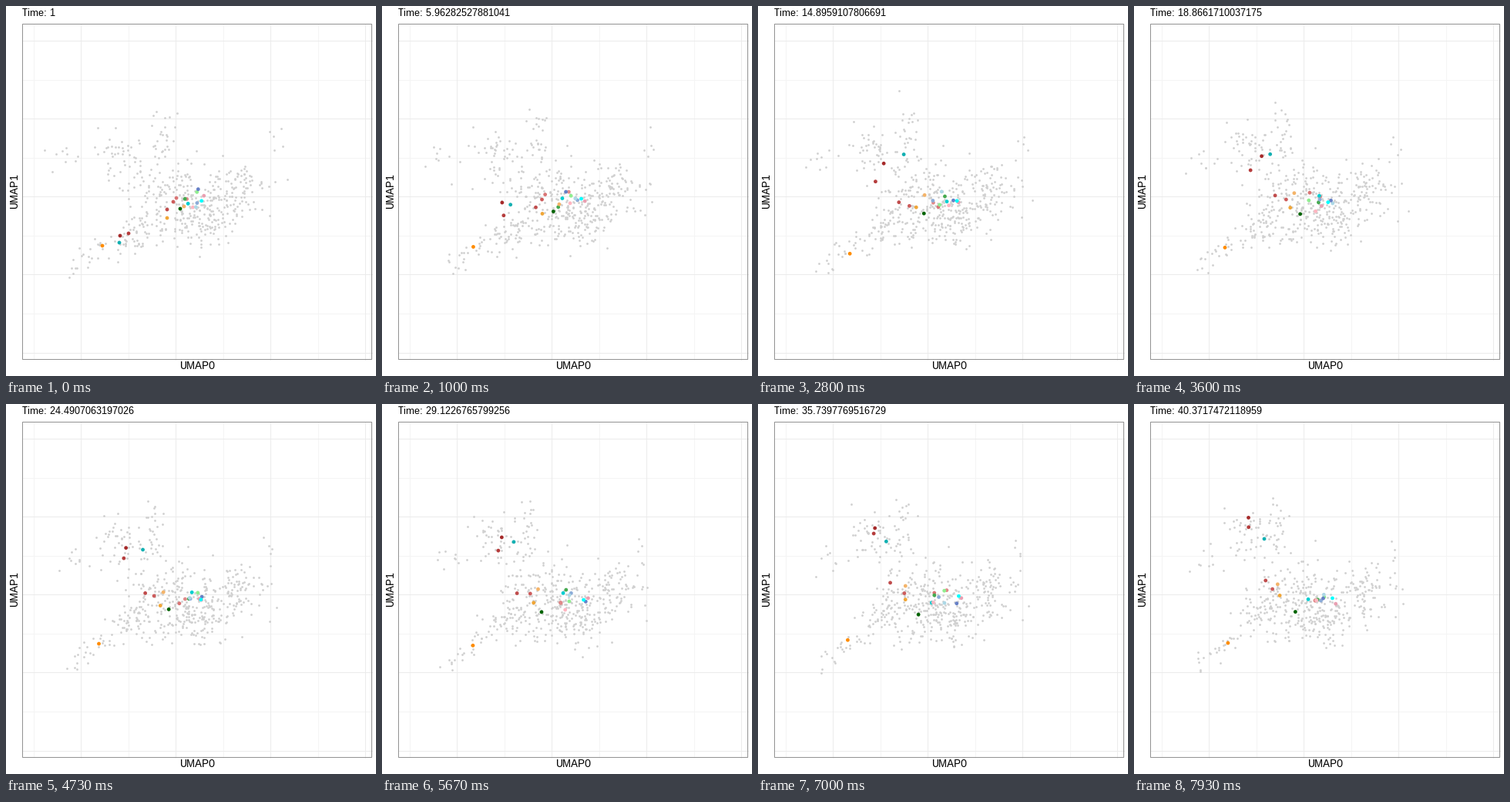
A matplotlib script that plays this animation: 480x480 px, repeating every 8 s.

```python
import numpy as np
import matplotlib.pyplot as plt
from matplotlib.animation import FuncAnimation
from matplotlib.patches import Rectangle

SIZE, DPI = 480, 96
PX = 72 / DPI                      # points per pixel
LOOP, TICKS, POSES = 8000, 400, 120
T = 1 + np.arange(POSES) * 89 / 269
STEPS = np.arange(43)

rng = np.random.default_rng(12)
# whole-pixel glyph spacing
plt.rcParams.update({"font.family": "Liberation Sans",
                     "text.hinting": "default", "text.hinting_factor": 1})


def tween(walk):
    """Linear motion between the places a point has at whole times."""
    k = T.astype(int)
    f = (T - k)[:, None]
    return walk[:, k] * (1 - f) + walk[:, k + 1] * f


def drift(when, places):
    return np.stack([np.interp(STEPS, when, axis) for axis in zip(*places)], axis=-1)


def blob(n, spread, start, end, tilt=0):
    """A drifting cluster whose points take a fresh, heavy-tailed jolt each step."""
    off = np.clip(rng.normal(size=(n, 1, 2)), -2.2, 2.2) * spread
    off[..., 1] += tilt * off[..., 0]
    jolt = np.clip(rng.standard_t(4, size=(n, len(STEPS), 2)), -7, 7) * 4.5
    walk = drift((1, 41), (start, end)) + off + jolt
    return tween(np.clip(walk, (50, 84), (372, 352)))


def marked(places, jolt):
    """One coloured point: its first place is exact, later ones are jolted."""
    noise = np.clip(rng.normal(size=(1, len(STEPS), 2)), -2, 2) * jolt
    noise[:, 1] = 0
    return tween(drift((1, 12, 41), places) + noise)


cloud = np.concatenate([
    blob(145, (30, 21), (252, 262), (234, 264)),            # core
    blob(80, (25, 26), (205, 240), (200, 245)),             # its left side
    blob(45, (32, 11), (225, 290), (228, 288)),             # its lower rim
    blob(85, (22, 20), (304, 240), (302, 245)),             # right arm
    blob(50, (15, 12), (162, 296), (160, 268), -0.5),       # tail root
    blob(22, (16, 6), (104, 327), (106, 322), -0.7),        # tail tip
    blob(44, (15, 15), (152, 195), (150, 166)),             # upper left
    blob(24, (6, 20), (203, 165), (185, 155)),              # plume
    blob(10, (20, 12), (80, 190), (98, 200)),               # far left
    blob(5, (8, 10), (348, 175), (338, 200)),               # far right
])

# central points, ordered from left to right
core_colors = ["#d97575", "#e08a8a", "#46aa50", "#00ced1", "#8cacd8", "#ffb6c1",
               "#90ee90", "#add8e6", "#6680c6", "#e9a0b2", "#00ffff"]
dots = []
for color, x in zip(core_colors, np.linspace(225, 256, len(core_colors))):
    home = (x, 253)
    first = home + rng.normal(size=2) * (4, 7)
    dots.append((color, marked((first, home, home), (9, 7))))

# points that travel away from the centre: start, early place, end
for color, *places in [
    ("#f4b46a", (231, 260), (216, 252), (190, 234)),
    ("#f0a637", (209, 275), (210, 262), (189, 250)),
    ("#cd5c5c", (217, 254), (203, 257), (184, 240)),
    ("#c04c4c", (209, 264), (185, 258), (170, 228)),
    ("#006400", (226, 263), (210, 267), (212, 272)),
    ("#12b0b2", (147, 307), (187, 193), (164, 174)),
    ("#b53c3c", (159, 295), (153, 238), (150, 154)),
    ("#a52a2a", (148, 298), (165, 208), (146, 149)),
    ("#ff8c00", (125, 311), (116, 320), (121, 306)),
]:
    dots.append((color, marked(places, 3)))
colors = [color for color, _ in dots]
tracks = np.concatenate([track for _, track in dots])

fig = plt.figure(figsize=(SIZE / DPI, SIZE / DPI), dpi=DPI, facecolor="white")
ax = fig.add_axes([0, 0, 1, 1])
ax.set(xlim=(0, SIZE), ylim=(SIZE, 0))
ax.axis("off")


def grid(x0, y0, color):
    style = dict(color=color, lw=PX, snap=True, zorder=1)
    for i in range(5):
        x, y = int(x0 + 123 * i), int(y0 + 101.3 * i)
        if x < 475:
            ax.plot([x, x], [23, 459], **style)
        if y < 459:
            ax.plot([21, 475], [y, y], **style)


grid(36, 96, "#f4f4f4")
grid(97, 45, "#ebebeb")
ax.add_patch(Rectangle((21, 23), 453, 435, fill=False, ec="#939393",
                       lw=PX, snap=True, zorder=4))

label = dict(size=14 * PX, ha="center", va="baseline", rotation_mode="anchor")
ax.text(248, 471, "UMAP0", **label)
ax.text(15, 240, "UMAP1", rotation=90, **label)
title = ax.text(21, 13, "", size=13 * PX, va="baseline")


def scatter(tracks, diameter, color, z):
    return ax.scatter(*tracks[:, 0].T, s=(diameter * PX) ** 2, c=color, lw=0, zorder=z)


grey = scatter(cloud, 2.8, "#d0d0d0", 2)
bright = scatter(tracks, 4.8, colors, 3)


def draw(tick):
    k = int((tick + .75) * POSES / TICKS)
    title.set_text(f"Time: {T[k]:.15g}")
    grey.set_offsets(cloud[:, k])
    bright.set_offsets(tracks[:, k])
    return title, grey, bright


anim = FuncAnimation(fig, draw, frames=TICKS, interval=LOOP / TICKS,
                     repeat=True, repeat_delay=0)
plt.show()
```
